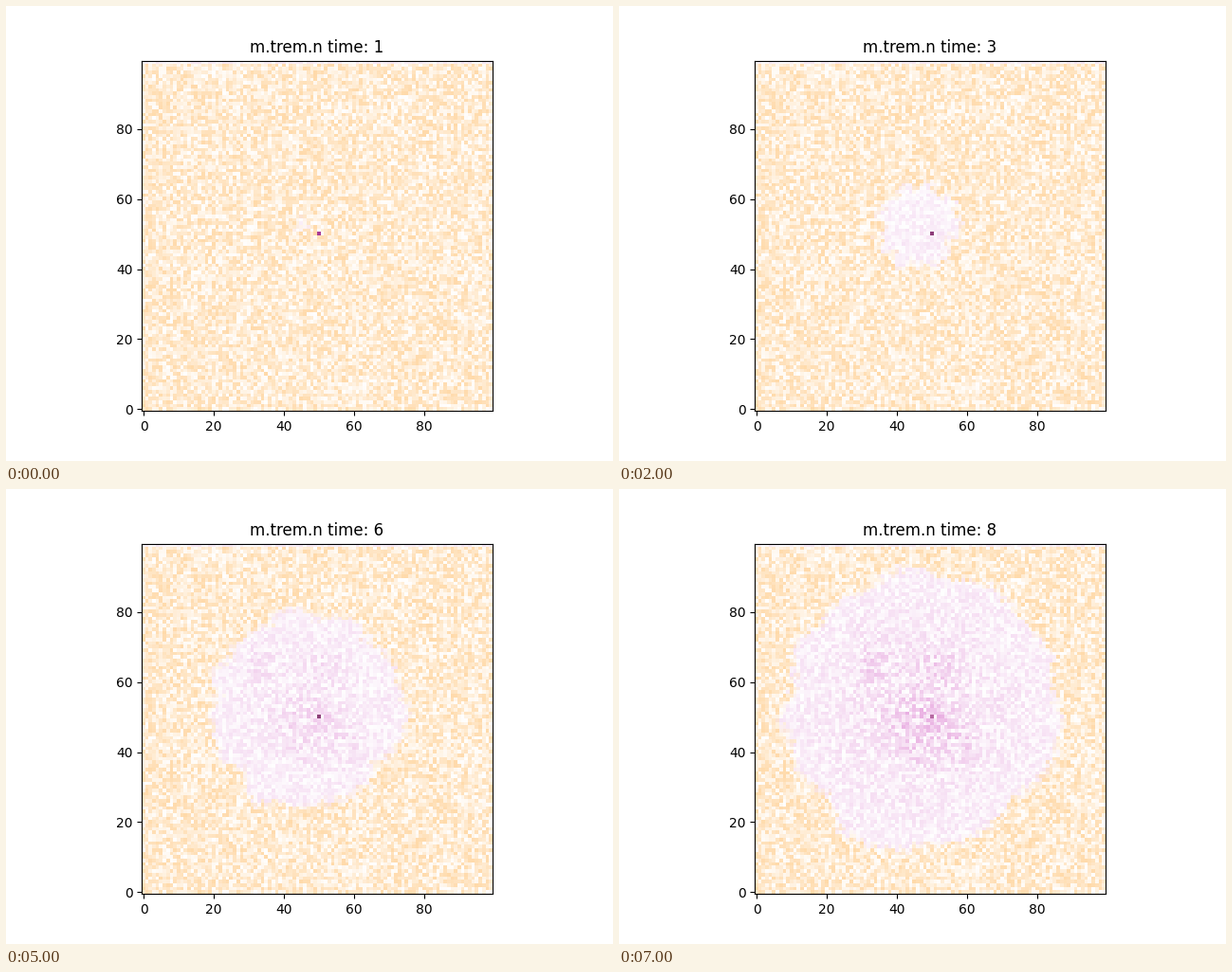
A matplotlib script for the animation above (8 s loop, 640x480 px).

```python
import numpy as np
import matplotlib.pyplot as plt
from matplotlib.animation import FuncAnimation

SIZE = 100
STEPS = 8
SEED_CELL = (50, 50)

ORANGE_DEPTH = np.array([0, 37, 85]) / 255
PINK_DEPTH = np.array([26, 97, 35]) / 255
VIOLET = np.array([168, 60, 150])
PLUM = np.array([138, 62, 118])

rng = np.random.default_rng(7)
y, x = np.mgrid[:SIZE, :SIZE]
base = rng.random((SIZE, SIZE))
grain = rng.random((SIZE, SIZE))
rough = rng.uniform(-1, 1, (SIZE, SIZE))
rough += 0.6 * (np.roll(rough, 1, 0) + np.roll(rough, 1, 1))
phases = rng.uniform(0, 2 * np.pi, 12)


def bump(cx, cy, width):
    return np.exp(-((x - cx) ** 2 + (y - cy) ** 2) / (2 * width ** 2))


def build_soil():
    soil = 1 - base[..., None] * ORANGE_DEPTH
    soil[-1] = 1 - 0.25 * base[-1][:, None] * PINK_DEPTH
    return soil


def build_density():
    """Broad halo with a few denser clumps around the centre."""
    density = 0.6 * np.exp(-np.hypot(x - 47, y - 52) / 25)
    for cx, cy in [(42, 50), (51, 50), (58, 43), (45, 41), (52, 65), (33, 65)]:
        density += 0.35 * bump(cx, cy, 3.5)
    return density


def spread(t):
    """Share of each cell behind the ragged, widening front at time t."""
    dx, dy = x - 45.5 - 0.25 * (t - 1), y - 52.5
    angle = np.arctan2(dy, dx)
    radius = 4.4 * t - 2.9 + 0.1 * t ** 2
    tongue = 0.12 * np.exp(-((angle + 1.95) / 0.2) ** 2)
    waves = sum(np.sin(k * angle + p + 0.4 * t)
                for k, p in enumerate(phases, start=4))
    front = radius * (1 + tongue) + 0.4 * waves * min(1, radius / 12)
    return np.clip((front - np.hypot(dx, dy) + rough) / 1.5 + 0.5, 0, 1)


def seed_color(t):
    fade = 45 * ((t - 1) / (STEPS - 1)) ** 8
    return (PLUM + (VIOLET - PLUM) * np.exp(1 - t) + fade) / 255


def build_states():
    soil, density = build_soil(), build_density()
    cover = np.zeros((SIZE, SIZE))
    states = []
    for t in range(1, STEPS + 1):
        cover = np.maximum(cover, spread(t))
        growth = density * ((t - 1) / (STEPS - 1)) ** 1.7
        pink = 1 - (grain * (0.21 + 0.75 * growth))[..., None] * PINK_DEPTH
        state = soil + cover[..., None] * (pink - soil)
        state[SEED_CELL] = seed_color(t)
        states.append(np.clip(state, 0, 1))
    return states


states = build_states()
fig, ax = plt.subplots(figsize=(6.4, 4.8), dpi=100)
image = ax.imshow(states[0], origin="lower", interpolation="nearest")
ax.set_xticks(range(0, SIZE, 20))
ax.set_yticks(range(0, SIZE, 20))
title = ax.set_title("m.trem.n time: 1")


def update(i):
    image.set_data(states[i])
    title.set_text(f"m.trem.n time: {i + 1}")
    return image, title


anim = FuncAnimation(fig, update, frames=STEPS, interval=1000, repeat=True)
plt.show()
```
